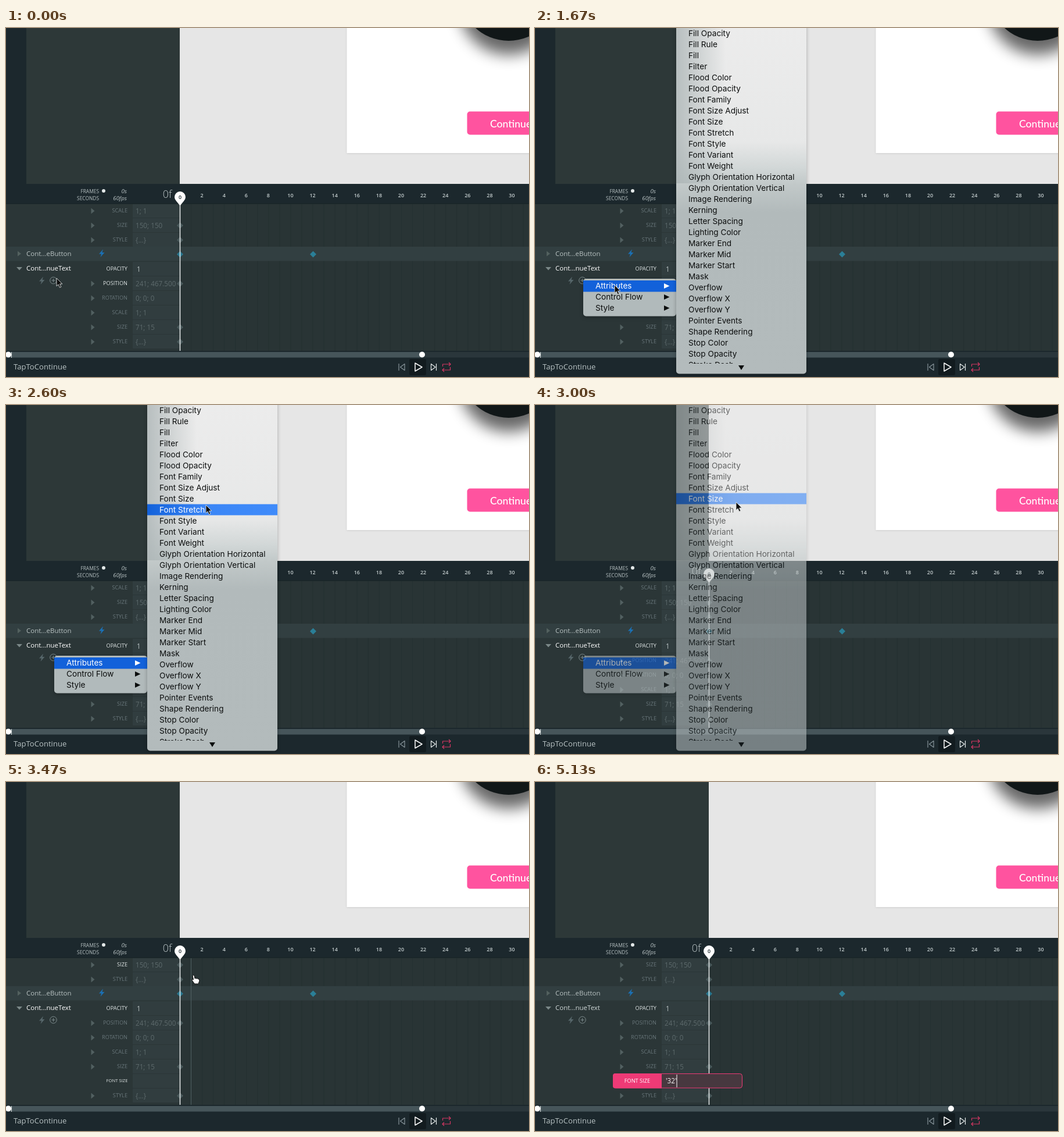
An HTML page that plays this animation: 900x600 px, repeating every 6.33 s.

```html
<!DOCTYPE html>
<html lang="en">
<head>
<meta charset="utf-8">
<title>Timeline: add a font size</title>
<style>
html, body { margin: 0; width: 100%; height: 100%; overflow: hidden; background: #1c282d; }
svg { display: block; width: 900px; height: 600px; }
text { font-family: "Open Sans", "Noto Sans", sans-serif; white-space: pre; }
.label { font-size: 9.2px; fill: #68767a; text-anchor: end; }
.label.on { fill: #dfe5e5; }
.value { font-size: 11.7px; fill: #5d6a6c; }
.value.on { fill: #b9c3c3; }
.name { font-size: 11.5px; fill: #b8c2c2; }
.tick { font-size: 9px; font-weight: 600; fill: #c3cccd; text-anchor: middle; }
.head { font-size: 8.4px; fill: #b9c3c4; text-anchor: end; }
.menu text { font-family: Inter, Roboto, sans-serif; font-size: 13.65px; fill: #0b0d0d; }
.menu text.on { fill: #fff; }
.menu { filter: drop-shadow(0 2px 3px rgba(0, 0, 0, .28)); }
</style>
</head>
<body>
<svg id="stage" viewBox="0 0 900 600" xmlns="http://www.w3.org/2000/svg"></svg>
<script>
const LOOP = 6330, STEP = 200 / 3, PITCH = 25, FRAME = 19.05;
const PINK = '#ee3a76', BLUE = '#1261da', DARK = '#1c282d';

const rect = (x, y, w, h, fill, more = '') =>
  `<rect x="${x}" y="${y}" width="${w}" height="${h}" fill="${fill}" ${more}/>`;
const path = (d, fill, more = '') => `<path d="${d}" fill="${fill}" ${more}/>`;
const text = (x, y, s, cls = '', more = '') =>
  `<text x="${x}" y="${y}" class="${cls}" ${more}>${s}</text>`;
const times = (n, fn) => Array.from({ length: n }, (_, i) => fn(i)).join('');
const diamond = (x, y, fill) => path(`M${x - 5.5} ${y}l5.5-5.5 5.5 5.5-5.5 5.5z`, fill);
const bolt = (x, y, fill) => path(`M${x + 2} ${y - 6.5}l-7 8h4l-1.5 5.5 7-8h-4z`, fill);

const rowY = i => 313.5 + PITCH * i;
const slots = [
  ['SCALE', '1; 1'], ['SIZE', '150; 150', 1], ['STYLE', '{...}', 1], null, ['OPACITY', '1'],
  ['POSITION', '241; 467.500', 1], ['ROTATION', '0; 0; 0'], ['SCALE', '1; 1'],
  ['SIZE', '71; 15', 1], ['STYLE', '{...}', 1]
];

function property(i) {
  if (!slots[i]) return '';
  const [label, value, keyed] = slots[i], y = rowY(i), plain = label === 'OPACITY';
  return rect(218, y - 11.5, 81, 24, '#313d3f', 'rx="1"') +
    text(209, y + 3.5, label, plain ? 'label on' : 'label', `data-row="${i}"`) +
    text(plain ? 225 : 223, y + 5, value, plain ? 'value on' : 'value') +
    (plain ? '' : path(`M146.500 ${y - 4}l6 5-6 5z`, '#526061')) +
    (keyed ? diamond(299.5, y + 1, '#4b5b5d') : '');
}

const items = ['Fill Opacity', 'Fill Rule', 'Fill', 'Filter', 'Flood Color', 'Flood Opacity', 'Font Family',
  'Font Size Adjust', 'Font Size', 'Font Stretch', 'Font Style', 'Font Variant', 'Font Weight',
  'Glyph Orientation Horizontal', 'Glyph Orientation Vertical', 'Image Rendering', 'Kerning', 'Letter Spacing',
  'Lighting Color', 'Marker End', 'Marker Mid', 'Marker Start', 'Mask', 'Overflow', 'Overflow X', 'Overflow Y',
  'Pointer Events', 'Shape Rendering', 'Stop Color', 'Stop Opacity', 'Stroke Dash'];

const defs = `<defs>
  <linearGradient id="glass" x2="0" y2="1">
    <stop offset="0" stop-color="#ececec"/><stop offset=".34" stop-color="#e7e8e8"/>
    <stop offset=".41" stop-color="#d3d8d8"/><stop offset=".46" stop-color="#c2c9c9"/>
    <stop offset=".54" stop-color="#b2babb"/><stop offset="1" stop-color="#b3bbbc"/>
  </linearGradient>
  <linearGradient id="side">
    <stop offset="0" stop-color="#aab3b4" stop-opacity=".8"/><stop offset=".38" stop-color="#aab3b4" stop-opacity="0"/>
  </linearGradient>
  <linearGradient id="pick">
    <stop offset="0" stop-color="${BLUE}"/><stop offset=".45" stop-color="#3b86f6"/><stop offset="1" stop-color="#3f8bfa"/>
  </linearGradient>
  <filter id="blur" x="-50%" y="-50%" width="200%" height="200%"><feGaussianBlur stdDeviation="13"/></filter>
  <filter id="soft"><feGaussianBlur stdDeviation="1.5"/></filter>
  <clipPath id="listClip"><rect y="303" width="900" height="252"/></clipPath>
  <clipPath id="boardClip"><rect x="587" width="313" height="215"/></clipPath>
  <clipPath id="itemClip"><rect x="243" width="224" height="577"/></clipPath>
</defs>`;

const canvasArea = rect(0, 0, 35, 268, DARK) + rect(35, 0, 264, 268, '#2d3838') +
  rect(299, 0, 601, 268, '#e6e6e6') +
  rect(586.5, -9, 320, 225, '#cdcdcd', 'filter="url(#soft)"') + rect(586.5, 0, 314, 215, '#fff') +
  `<g clip-path="url(#boardClip)"><circle cx="865" cy="-40" r="86" opacity=".6" filter="url(#blur)"/>
   <circle cx="865" cy="-63" r="85" fill="#111718"/></g>` +
  rect(793.5, 143.5, 120, 40, '#ff539f', 'rx="5"') +
  text(833, 170.5, 'Continue', '', 'fill="#fff" style="font:500 17.6px Lato,sans-serif"');

const timeline = rect(0, 302, 900, 254, '#2b3637') + rect(299, 302, 601, 254, '#293435') +
  times(31, i => rect((318 + FRAME * i).toFixed(1), 303, 1, 252, '#243031'));

const list = `<g clip-path="url(#listClip)">
  <g id="rows">
    ${rect(0, 376, 900, 24.5, '#323f41')}
    ${times(9, property)}
    ${path('M20 383.500l6 4.500-6 4.500z', '#53615f')}
    ${text(35, 392, 'Cont...eButton', 'name')}${bolt(165, 387, '#1b70b4')}
    ${diamond(299.5, 389, '#2a7890')}${diamond(528.5, 389, '#2a7f97')}
    ${path('M18 411h10l-5 5.500z', '#7b8888')}
    ${text(35, 417, 'Cont...nueText', 'name', 'id="name"')}
    ${bolt(62, 434, '#56666a')}
    <g fill="none" stroke="#7e8c8e"><circle cx="81.500" cy="434" r="5.800"/><path d="M78.500 434h6M81.500 431v6"/></g>
  </g>
  <g id="fontRow">
    ${rect(218, 502, 81, 24, '#313d3f', 'rx="1"')}
    ${text(209.5, 516, 'FONT SIZE', 'label on', 'style="font-size:7.7px"')}
  </g>
  ${property(9)}
  ${rect(318, 303, 1, 252, '#506062', 'id="guide"')}
</g>`;

const ruler = rect(0, 268, 900, 34, DARK) + rect(0, 301.500, 900, 1, '#152024') +
  text(160, 283.5, 'FRAMES', 'head') + text(160, 295.5, 'SECONDS', 'head') +
  '<circle cx="168" cy="280" r="3" fill="#e3e8e8"/>' +
  text(208, 283.5, '0s', 'head', 'style="font-size:9.8px;font-style:italic"') +
  text(208, 296, '60fps', 'head', 'style="font-size:9.8px;font-style:italic"') +
  text(285.5, 291.5, '0f', 'head', 'style="font-size:18px;font-weight:300"') +
  times(15, i => text((299 + FRAME * 2 * (i + 1)).toFixed(1), 290.5, 2 * i + 2, 'tick'));

const playhead = rect(298.8, 300, 1.4, 255, '#f4f7f7') +
  path('M299.500 305.500l-6.500-8A9.500 9.500 0 1 1 306 297.500z', '#fff') +
  text(299.5, 293.5, '0', 'tick', 'style="fill:#1c282d"');

const footer = rect(0, 555, 900, 45, DARK) + rect(0, 557, 900, 9.5, '#2a363b') + rect(0, 557, 716, 9.500, '#46555a') +
  rect(9, 557, 1, 10, '#dde3e3') + '<g fill="#fff"><circle cx="4" cy="561.500" r="5"/><circle cx="716" cy="561.500" r="5"/></g>' +
  text(13, 586.5, 'TapToContinue', '', 'font-size="13.1" fill="#b9c3c4"') +
  rect(694, 569, 29, 28, '#121b1f', 'rx="3"') +
  `<g fill="none" stroke-width="1.200" stroke-linejoin="round">
    <path d="M676 577v12M686 577.500v11l-7.500-5.500z" stroke="#87949a"/>
    <path d="M704 576v14l12-7z" stroke="#fff" stroke-width="1.500"/>
    <path d="M731.500 577.500v11l7.500-5.500zM740.500 577v12" stroke="#e8eded"/>
    <path d="M751.500 582v-4h13M762 575l3 3-3 3M764.500 583v5h-13M754 585l-3 3 3 3" stroke="#d63763"/>
  </g>`;

const editor = `<g id="editor">
  ${rect(134.5, 501.5, 222, 24.5, '#47383f', `rx="4" stroke="${PINK}"`)}
  ${path('M218 501h-80a4 4 0 0 0-4 4v17.500a4 4 0 0 0 4 4h80z', PINK)}
  ${text(198, 517, 'FONT SIZE', 'label', 'style="fill:#fff"')}
  ${text(225, 518, '', 'value', 'id="typed" style="fill:#f3f3f3"')}
  ${rect(0, 503, 1, 22, '#fff', 'id="caret"')}
</g>`;

const menus = `<g id="menus">
  <g class="menu">
    ${rect(83, 431, 160, 64.5, '#b1babb', 'rx="5"')}
    ${rect(83, 434, 160, 19.5, BLUE, 'id="mainMark"')}
    ${['Attributes', 'Control Flow', 'Style'].map((s, i) =>
      text(104, 448.4 + 19 * i, s, 'main') + path(`M222 ${439 + 19 * i}l9.500 4.500-9.500 4.500z`, '#0b0d0d', 'class="arrow"')).join('')}
  </g>
  <g class="menu" id="sub">
    ${rect(243, -10, 224, 604.5, 'url(#glass)', 'rx="5"')}
    ${rect(243, 0, 224, 267, 'url(#side)')}
    ${rect(243, 0, 224, 19, 'url(#pick)', 'id="subMark"')}
    <g clip-path="url(#itemClip)">${items.map((s, i) => text(264, 13.5 + 19 * i, s, 'item')).join('')}</g>
    ${path('M350 580h10l-5 8z', '#0b0d0d')}
  </g>
</g>`;

const cursors = `<g id="cursor" stroke-linejoin="round">
  ${path('M0 0v13.800l3.100-2.900 2.300 5.300 2.500-1.100-2.300-5.100h4.300z', '#0c0c0c', 'id="arrow" stroke="#dfe3e3" stroke-width=".900"')}
  ${path('M-1.500 1q1.500-2 3 0l1 5 1.500-.8 1.500 1 1.500-.5 1.300 1.200 1.600.3q1.200 3-.7 5.300l-.6 2.500h-6.600l-4-5.500q-1.500-2.500 1-2.300l1 .8z', '#fff', 'id="hand" stroke="#111"')}
  <path id="beam" d="M-3-8q3 0 3 2V6q0 2 3 2M3-8q-3 0-3 2V6q0 2-3 2" fill="none" stroke="#e9eded" stroke-width="1.100"/>
</g>`;

const stage = document.getElementById('stage');
stage.innerHTML = defs + canvasArea + timeline + list + ruler + footer + playhead + editor + menus + cursors;
const el = Object.fromEntries([...stage.querySelectorAll('[id]')].map(e => [e.id, e]));
const labels = [...stage.querySelectorAll('[data-row]')].filter(e => e.textContent !== 'OPACITY');
const mainItems = stage.querySelectorAll('.main'), arrows = stage.querySelectorAll('.arrow');
const subItems = stage.querySelectorAll('.item');

// Pointer route: time, x, y
const route = [
  [0, 87, 430], [66, 82, 433], [1400, 82, 433], [1666, 137, 442], [1934, 137, 442], [2266, 250, 440],
  [2600, 344, 172], [2732, 346, 167], [3134, 346, 167], [3400, 331, 306], [3466, 323, 331],
  [3532, 302, 385], [3866, 278, 508], [4066, 278, 508], [4666, 290, 512]
];
const typing = [[0, ''], [4733, "'"], [4867, "'3"], [5000, "'32"], [5133, "'32'"]];
const fades = [[0, 0], [866, 1], [3000, .6], [3066, .23], [3132, 0]];
const latest = (table, t) => table.filter(([at]) => t >= at).pop()[1];

function pointer(t) {
  const next = route.findIndex(p => p[0] > t);
  if (next < 0) return route[route.length - 1].slice(1);
  const [a, b] = [route[next - 1], route[next]], k = (t - a[0]) / (b[0] - a[0]);
  return [a[1] + (b[1] - a[1]) * k, a[2] + (b[2] - a[2]) * k];
}

const show = (node, on) => node.setAttribute('visibility', on ? 'inherit' : 'hidden');

function render(time) {
  const t = Math.floor((time + 4) / STEP + 1e-6) * STEP + .5;
  const [x, y] = pointer(t);
  const added = t >= 3199, editing = t >= 4066;

  el.rows.setAttribute('transform', `translate(0 ${added ? -PITCH : 0})`);
  show(el.fontRow, added);
  show(el.guide, t > 3390 && t < 3590);
  el.name.style.fill = editing ? '#d0d8d8' : '#fff';
  el.name.style.fontWeight = editing ? 400 : 500;

  let hovered = -1;
  if (t < 60) hovered = 5;
  else if (t > 3460 && t < 4060) hovered = Math.floor((pointer(t - STEP)[1] - 301) / PITCH) + 1;
  labels.forEach(l => l.classList.toggle('on', hovered < 9 && +l.dataset.row === hovered));

  const opacity = latest(fades, t);
  el.menus.style.opacity = opacity;
  show(el.menus, opacity > 0);
  const attributes = t > 1460;
  show(el.mainMark, attributes);
  mainItems[0].classList.toggle('on', attributes);
  arrows[0].setAttribute('fill', attributes ? '#fff' : '#0b0d0d');

  show(el.sub, t > 1590);
  const flash = t > 2925 && t < 2990;
  const picked = t > 1950 && x > 243 && !flash ? Math.floor((y + .5) / 19) : -1;
  show(el.subMark, picked >= 0 && t > 1590);
  el.subMark.setAttribute('y', 19 * picked - .5);
  subItems.forEach((s, i) => s.classList.toggle('on', i === picked));

  show(el.editor, editing);
  el.typed.textContent = latest(typing, t);
  el.caret.setAttribute('x', 225 + el.typed.getComputedTextLength());

  el.cursor.setAttribute('transform', `translate(${x.toFixed(1)} ${y.toFixed(1)})`);
  show(el.cursor, t < 4730);
  show(el.arrow, t < 3390);
  show(el.hand, t > 3390 && !editing);
  show(el.beam, editing);
}

const start = performance.now();
(function tick() {
  render((performance.now() - start) % LOOP);
  requestAnimationFrame(tick);
})();
</script>
</body>
</html>
```
